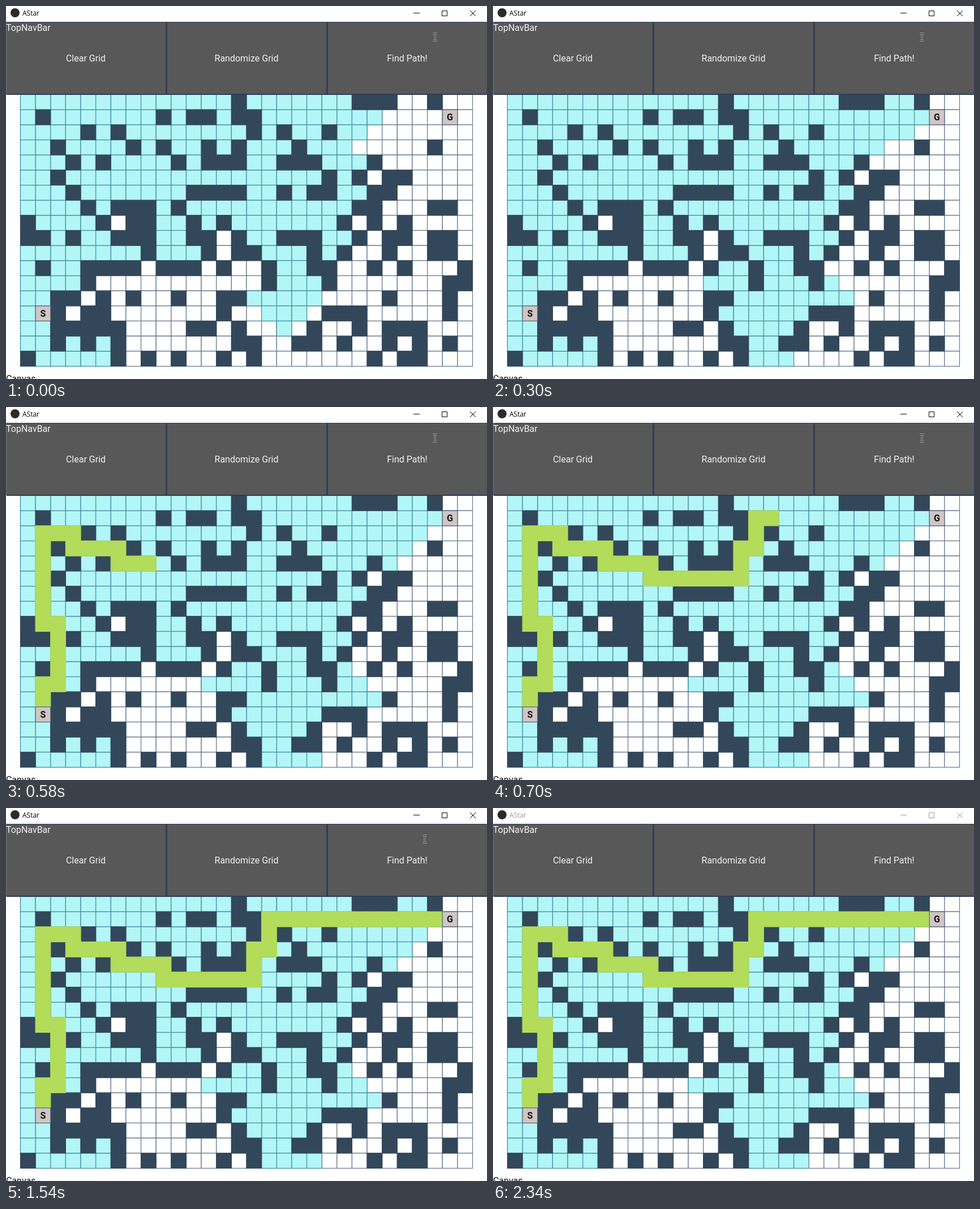
An HTML page with a canvas that plays this animation: 850x659 px, repeating every 2.37 s.

```html
<!DOCTYPE html>
<html lang="en">
<head>
<meta charset="utf-8">
<title>AStar</title>
<style>
html, body { margin: 0; height: 100%; overflow: hidden; background: #fff; }
canvas { display: block; }
</style>
</head>
<body>
<canvas width="850" height="659"></canvas>
<script>
const ctx = document.querySelector('canvas').getContext('2d');
const LOOP = 2370, COLS = 30, ROWS = 18;
const LEFT = 25.5, TOP = 156.5, CELL_W = 799 / COLS, CELL_H = 480 / ROWS;
const NAVY = '#33475b', GREEN = '#b2dc5a';

const maze = `
..............#.......###..#..
.#.......#.##.##..............
....#.#........#.#..#.........
..#....#.#..#.#...#........#..
...#.#....#.###..###...#......
..#.................#.#.##....
...#.......####..#.##..##.....
....#.###.#...........##...##.
#....#.##..#.#.......#.#.#....
##.#..###..##.#..###..#.##.##.
........#...#.##...#.#..#..##.
.#..####.###.#..#..##..#.#...#
....#...........#...#.......##
..##.#.#..#..##.........#...#.
..#.##.......#......###.....#.
..#####....##.#....#..#.###...
..#.#.#.......##..##.#..#.#.#.
#.....#.#.#..#.#.......#.##...`.trim().split('\n');

const start = { x: 1, y: 14, d: 0 }, goal = { x: 28, y: 1 };
const steps = { U: [0, -1], D: [0, 1], L: [-1, 0], R: [1, 0] };
const move = (c, k) => ({ x: c.x + steps[k][0], y: c.y + steps[k][1] });

// Breadth-first search; ties go to the cell nearest the goal.
function search(limit) {
  const found = [start], seen = new Set([start.x + ',' + start.y]);
  for (const cell of found) {
    if (cell.d === limit) continue;
    for (const k in steps) {
      const next = { ...move(cell, k), d: cell.d + 1 };
      const key = next.x + ',' + next.y;
      if (maze[next.y]?.[next.x] !== '.' || seen.has(key)) continue;
      seen.add(key);
      found.push(next);
    }
  }
  const toGoal = c => Math.abs(c.x - goal.x) + Math.abs(c.y - goal.y);
  return found.sort((a, b) => a.d - b.d || toGoal(a) - toGoal(b));
}

const visited = search(47);
const known = visited.filter(c => c.d <= 43).length;
const path = [];
let head = start;
for (const k of 'UURUUUULUUUUUURRDRRRDRRRDRRRRRRUURUU' + 'R'.repeat(11)) {
  path.push(head = move(head, k));
}

const open = [], walls = [];
maze.forEach((row, y) => [...row].forEach((ch, x) => (ch === '#' ? walls : open).push({ x, y })));

// Each stage: from, to, ticks, cells revealed.
const stages = [[0, 200, 6, 24], [200, 460, 8, 24], [460, 580, 4, 15], [580, 790, 7, 24]];
function revealed(t) {
  return stages.reduce((sum, [from, to, ticks, cells]) => {
    const p = Math.min(1, Math.max(0, (t - from) / (to - from)));
    return sum + Math.round(cells * Math.floor(p * ticks + 1e-6) / ticks);
  }, 0);
}

// Pointer keys: time, x, y.
const pointerKeys = [
  [1510, 758, 55], [1540, 740, 55], [1600, 702, 26], [1660, 668, 20], [1720, 640, 62],
  [1800, 612, 230], [1880, 595, 440], [1960, 587, 584], [2040, 589, 566], [2070, 581, 546]
];
function pointerAt(t) {
  if (t < 1540) return [758, 55];
  const tick = 500 / 17;
  const time = t >= 2070 ? 2070 : 1540 + Math.min(17, Math.floor((t - 1540) / tick + 1e-6)) * tick;
  const i = Math.max(1, pointerKeys.findIndex(k => k[0] >= time - 1e-6));
  const [t0, x0, y0] = pointerKeys[i - 1], [t1, x1, y1] = pointerKeys[i];
  const p = (time - t0) / (t1 - t0);
  return [Math.round(x0 + (x1 - x0) * p), Math.round(y0 + (y1 - y0) * p)];
}

function rect(color, x, y, w, h) {
  ctx.fillStyle = color;
  ctx.fillRect(x, y, w, h);
}

function text(str, x, y, color, font = '16px Roboto, sans-serif', align = 'center') {
  ctx.font = font;
  ctx.textAlign = align;
  ctx.fillStyle = color;
  ctx.fillText(str, x, y);
}

function line(color, width, d) {
  ctx.strokeStyle = color;
  ctx.lineWidth = width;
  ctx.stroke(new Path2D(d));
}

function drawCells(cells, fill, stroke) {
  ctx.fillStyle = fill;
  ctx.strokeStyle = stroke;
  ctx.lineWidth = 1.2;
  for (const { x, y } of cells) {
    const box = [LEFT + x * CELL_W, TOP + y * CELL_H, CELL_W, CELL_H];
    ctx.fillRect(...box);
    ctx.strokeRect(...box);
  }
}

function drawLetter(str, { x, y }) {
  text(str, LEFT + (x + 0.5) * CELL_W, TOP + (y + 0.5) * CELL_H + 5.5, '#111', 'bold 16px Roboto, sans-serif');
}

function drawTitleBar(active) {
  const ink = active ? '#000' : '#999';
  ctx.fillStyle = '#2b2b2b';
  ctx.beginPath();
  ctx.arc(16, 12, 8, 0, Math.PI * 2);
  ctx.fill();
  text('AStar', 29, 17, ink, '12px "Open Sans", sans-serif', 'left');
  line(ink, 1, 'M720 12.5h11M770.5 8.5h9v9h-9zM820 8l10 10M830 8l-10 10');
}

function drawNavBar() {
  rect('#777', 0, 28, 1, 128);
  rect('#2f3e52', 1, 28, 849, 129);
  ['Clear Grid', 'Randomize Grid', 'Find Path!'].forEach((label, i) => {
    const x = 1 + i * 284;
    rect('#585858', x, 29, 281, 126);
    text(label, x + 140, 98, '#f2f2f2');
  });
  text('TopNavBar', 0, 44, '#f2f2f2', undefined, 'left');
}

function drawPointer(t) {
  if (t >= 2100) return;
  const [x, y] = pointerAt(t);
  const beam = `M${x - 3.5} ${y - 6.5}h3l.5 .5l.5 -.5h3M${x} ${y - 6}v12M${x - 3.5} ${y + 6.5}h3l.5 -.5l.5 .5h3`;
  line('#c8c8c8', 2.6, beam);
  line('#111', 1, beam);
}

function draw(now) {
  const t = now % LOOP, count = revealed(t);
  const searched = known + Math.min(count, visited.length - known);
  rect('#fff', 0, 0, 850, 659);
  drawCells(open, '#fff', '#64768d');
  drawCells(visited.slice(0, searched), '#b2f6f7', '#438ca2');
  drawCells(walls, NAVY, NAVY);
  drawCells(path.slice(0, Math.max(0, known + count - visited.length)), GREEN, GREEN);
  drawCells([start, goal], '#d0c6c4', '#52647a');
  drawLetter('S', start);
  drawLetter('G', goal);
  drawNavBar();
  drawTitleBar(t < 2340);
  text('Canvas', 0, 664, '#111', undefined, 'left');
  drawPointer(t);
  requestAnimationFrame(draw);
}
requestAnimationFrame(draw);
</script>
</body>
</html>
```
